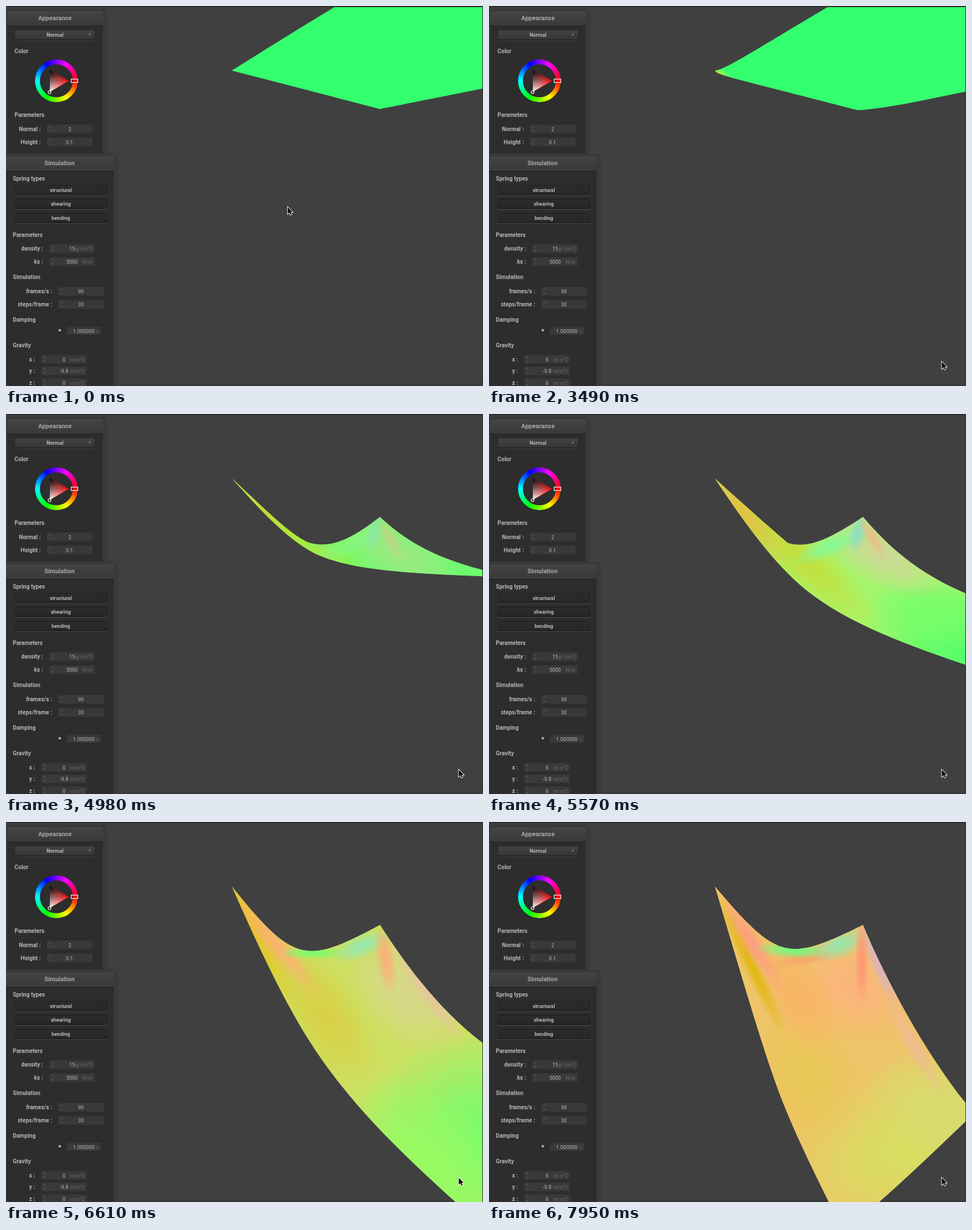
Write an HTML page with a canvas that moves like this. It is 838x668 px and loops after 8 s.

```html
<!DOCTYPE html>
<html>
<head>
<meta charset="utf-8">
<title>Cloth simulation</title>
<style>
html, body { margin: 0; width: 100%; height: 100%; overflow: hidden; background: #404040; }
canvas { display: block; }
</style>
</head>
<body>
<canvas id="stage" width="838" height="668"></canvas>
<script>
const W = 838, H = 668, LOOP = 8000;
const stage = document.getElementById('stage').getContext('2d');
const makeLayer = () => Object.assign(document.createElement('canvas'), { width: W, height: H }).getContext('2d');
const ui = makeLayer(), cloth = makeLayer();

// ---------- control panels ----------
function rect(x, y, w, h, color, radius = 0) {
  ui.fillStyle = color;
  ui.beginPath();
  ui.roundRect(x, y, w, h, radius);
  ui.fill();
}

function text(str, x, y, size = 10, weight = 'bold', color = '#b4b4b4', align = 'left') {
  ui.font = `${weight} ${size}px Roboto, sans-serif`;
  ui.fillStyle = color;
  ui.textAlign = align;
  ui.fillText(str, x, y + size * 0.36);
}

function line(points, color, width = 1) {
  ui.strokeStyle = color;
  ui.lineWidth = width;
  ui.beginPath();
  points.forEach(([x, y]) => ui.lineTo(x, y));
  ui.stroke();
}

function vertical(y0, y1, top, bottom) {
  const g = ui.createLinearGradient(0, y0, 0, y1);
  g.addColorStop(0, top);
  g.addColorStop(1, bottom);
  return g;
}

function panel(x, y, w, h, title) {
  rect(x - 8, y - 6, w + 16, h + 8, '#3a3a3a', 8);
  rect(x, y, w, h, '#2d2d2d', 2);
  rect(x, y, w, 25, vertical(y, y + 25, '#434343', '#393939'), 2);
  line([[x, y + 0.5], [x + w, y + 0.5]], '#4c4c4c');
  line([[x, y + 25.5], [x + w, y + 25.5]], '#1c1c1c');
  text(title, x + w / 2, y + 11, 11, 'bold', '#a6a6a6', 'center');
}

function button(x, y, w, h, label, top, bottom) {
  rect(x - 0.5, y - 0.5, w + 1, h + 2, '#4e4e4e', 2);
  rect(x - 0.5, y - 0.5, w + 1, h + 1, '#1b1b1b', 2);
  rect(x + 0.5, y + 0.5, w - 1, h - 1.5, vertical(y, y + h, top, bottom), 1);
  text(label, x + w / 2, y + h / 2, 9, 'bold', '#b8b8b8', 'center');
}

function field(label, y, x, value, cx, unit = '') {
  text(label, x - 11, y, 10, 'bold', '#b4b4b4', 'right');
  rect(x, y - 7.5, 80, 15, '#393939', 2);
  for (const d of [-1, 1])
    line([[x + 3.5, y + d * 2.5], [x + 5.5, y + d * 4.5], [x + 7.5, y + d * 2.5]], '#727272', 0.8);
  text(value, cx, y + 0.5, 9, 'normal', '#b8b8b8', 'center');
  text(unit, x + 76, y + 0.5, 9, 'normal', '#6c6c6c', 'right');
}

function colorWheel(cx, cy) {
  const ring = ui.createConicGradient(0, cx, cy);
  for (let i = 0; i <= 6; i++) ring.addColorStop(i / 6, `hsl(${i * 60} 100% 50%)`);
  ui.strokeStyle = ring;
  ui.lineWidth = 8.5;
  ui.beginPath();
  ui.arc(cx, cy, 33.2, 0, 7);
  ui.stroke();

  const fade = (x0, y0, x1, y1, from, to) => {
    const g = ui.createLinearGradient(x0, y0, x1, y1);
    g.addColorStop(0, from);
    g.addColorStop(1, to);
    ui.fillStyle = g;
    ui.fill();
  };
  ui.beginPath();
  ui.moveTo(cx + 22, cy);
  ui.lineTo(cx - 11.5, cy + 19.5);
  ui.lineTo(cx - 11.5, cy - 19.5);
  ui.closePath();
  fade(cx + 22, cy, cx - 11.5, cy + 19.5, '#f00', '#fff');
  fade(cx - 11.5, cy - 19.5, cx + 5, cy + 10, '#000', '#0000');

  ui.lineWidth = 1.2;
  ui.strokeStyle = '#fff';
  ui.strokeRect(cx + 26, cy - 3, 11.5, 6);
  ui.beginPath();
  ui.arc(cx - 12, cy + 20, 2.5, 0, 7);
  ui.stroke();
}

function drawUi() {
  rect(0, 0, W, H, '#404040');
  rect(197, 664, W, 4, '#3b3b3b');
  rect(0, 0, W, 1.5, '#232323');
  rect(837, 0, 1, H, '#2c2c2c');

  panel(2, 10, 168, 255, 'Appearance');
  button(15, 42, 142, 18, 'Normal', '#434343', '#353535');
  line([[146, 48], [148, 50], [146, 52]], '#b8b8b8');
  text('Color', 15, 79);
  colorWheel(88.5, 131.5);
  text('Parameters', 15, 191);
  field('Normal :', 216, 72, '2', 112);
  field('Height :', 239, 72, '0.1', 111.5);

  panel(-1, 265, 190, 420, 'Simulation');
  text('Spring types', 12, 303);
  ['structural', 'shearing', 'bending'].forEach((s, i) =>
    button(16, 315 + i * 24.6, 160.5, 17, s, '#2c2c2c', '#262626'));
  text('Parameters', 12, 402);
  field('density :', 426.5, 76, '15', 116, 'g/cm^2');
  field('ks :', 449.5, 76, '5000', 116, 'N/m');
  text('Simulation', 12, 476.5);
  field('frames/s :', 501.5, 92, '90', 131.5);
  field('steps/frame :', 524.5, 92, '30', 131.5);
  text('Damping', 12, 551.5);
  rect(90, 566, 9, 9, '#1c1c1c', 5);
  rect(91, 566.5, 7, 7, '#4a4a4a', 4);
  rect(92.5, 568, 4, 4, '#b0b0b0', 2);
  rect(107, 564, 60, 14, '#393939', 2);
  text('1.000000', 155.5, 571.5, 9, 'normal', '#b8b8b8', 'right');
  text('%', 163, 571.5, 8, 'normal', '#6c6c6c', 'right');
  text('Gravity', 12, 596.5);
  field('x :', 621, 62, '0', 102, 'm/s^2');
  field('y :', 641.5, 62, '-9.8', 102, 'm/s^2');
  field('z :', 662, 62, '0', 102, 'm/s^2');
}

// ---------- cloth ----------
// Each curve starts at PIN and holds two cubic segments per key.
const PIN = [397, 113.5];
const KNOTS = [-1, 0, 6, 14, 21, 30];
const nearEdge = [
  [484, 136, 570, 158, 657, 181, 720, 168, 800, 153, 900, 132],
  [402, 120, 520, 150, 657, 181, 685, 184, 800, 157, 900, 138],
  [500, 222, 560, 250, 657, 181, 690, 200, 760, 228, 900, 232],
  [515, 250, 540, 258, 657, 181, 710, 243, 775, 300, 900, 338],
  [507, 251, 528, 250, 657, 181, 703, 252, 780, 362, 890, 423],
  [509, 246, 526, 245, 657, 181, 700, 285, 775, 422, 852, 512]
];
const freeEdge = [
  [450, 80, 505, 46, 577, 2, 680, -61, 780, -123, 900, -197],
  [412, 114, 470, 76, 595, 2, 700, -60, 800, -120, 900, -179],
  [440, 146, 485, 176, 545, 176, 615, 174, 760, 138, 900, 104],
  [440, 178, 490, 250, 545, 299, 625, 370, 750, 412, 900, 462],
  [432, 193, 480, 300, 530, 380, 610, 508, 720, 606, 850, 722],
  [430, 224, 465, 345, 496, 437, 527, 530, 570, 612, 620, 715]
];
const fold = [
  nearEdge[0],
  [403, 122, 420, 124, 648, 183, 680, 183, 800, 157, 900, 138],
  [455, 170, 503, 226, 555, 230, 590, 226, 720, 226, 900, 231],
  [440, 152, 483, 191, 524, 226, 620, 280, 720, 320, 900, 345],
  [430, 165, 480, 230, 525, 300, 620, 380, 700, 450, 880, 560],
  [430, 180, 480, 260, 540, 330, 620, 400, 700, 480, 780, 560]
];

// Surface tints per key: base, then soft ellipses [x, y, rx, ry, angle, color].
const GREEN = '#34ff6e';
const tints = [
  [GREEN],
  [GREEN, [404, 117, 24, 8, 0.4, '#9cf040']],
  [GREEN,
    [455, 160, 215, 90, 0.5, '#86fa00'], [500, 190, 90, 36, 0.6, '#86fa00'],
    [455, 149, 75, 9, 0.55, '#c4f090'], [552, 231, 36, 8, 0, '#34f58c']],
  ['#a6f66c',
    [860, 420, 210, 120, 0.3, '#4cff68'], [780, 350, 120, 60, 0.3, '#78ff6a'],
    [690, 245, 130, 60, 0.5, '#cfd898'], [545, 250, 190, 50, 0.75, '#c4de3c'],
    [440, 165, 130, 42, 0.9, '#e4c040'], [600, 232, 75, 20, -0.4, '#86f896'],
    [648, 207, 16, 42, 0.25, '#90dcc4'], [674, 217, 14, 48, -0.5, '#e6c088']],
  ['#cde062',
    [850, 560, 240, 200, 0, '#72ff6c'], [740, 600, 190, 120, 0.8, '#98fb62'],
    [700, 300, 130, 80, 0.8, '#d8d88c'], [560, 340, 150, 70, 1, '#d8d044'],
    [430, 180, 170, 34, 1.1, '#e4c41c'], [475, 215, 125, 24, 0.88, '#fcb070'],
    [540, 230, 62, 12, 0, '#78fc70'], [625, 218, 55, 22, -0.4, '#94e8b0'],
    [667, 240, 18, 64, -0.15, '#fcae78'], [740, 300, 120, 18, 0.95, '#e6c69c']],
  ['#eec468',
    [740, 570, 240, 150, -0.4, '#d6e060'], [800, 510, 150, 100, 0.6, '#d8dc70'],
    [560, 450, 130, 90, 1.2, '#e8c854'], [640, 290, 120, 90, 0.5, '#fcb47c'],
    [545, 310, 110, 60, 1, '#f8b464'], [460, 250, 150, 16, 1.13, '#e0b810'],
    [463, 213, 108, 20, 1.02, '#ff9c80'], [555, 240, 70, 13, -0.2, '#f8a468'],
    [535, 225, 70, 15, 0.05, '#6cfc80'], [617, 215, 52, 26, -0.4, '#94e8b0'],
    [683, 245, 16, 95, -0.4, '#d8b4c0'], [655, 245, 13, 80, 0, '#ff9674'],
    [745, 390, 110, 18, 1.05, '#f0bc90']]
];

function segment(knots, s) {
  let i = 0;
  while (i < knots.length - 2 && s >= knots[i + 1]) i++;
  return i;
}

function spline(knots, keys, s) {
  const i = segment(knots, s), span = knots[i + 1] - knots[i], u = (s - knots[i]) / span;
  const last = keys.length - 1;
  return keys[i].map((a, k) => {
    const slope = j => {
      const lo = Math.max(j - 1, 0), hi = Math.min(j + 1, last);
      return (keys[hi][k] - keys[lo][k]) / (knots[hi] - knots[lo]) * span;
    };
    const d = keys[i + 1][k] - a, m0 = slope(i), m1 = slope(i + 1);
    return a + u * (m0 + u * (3 * d - 2 * m0 - m1 + u * (m0 + m1 - 2 * d)));
  });
}

function fillBetween(p, q) {
  const [x, y] = q.slice(10);
  cloth.beginPath();
  cloth.moveTo(...PIN);
  cloth.bezierCurveTo(...p.slice(0, 6));
  cloth.bezierCurveTo(...p.slice(6));
  cloth.quadraticCurveTo(x + 20, y + 3, x, y);
  cloth.bezierCurveTo(q[8], q[9], q[6], q[7], q[4], q[5]);
  cloth.bezierCurveTo(q[2], q[3], q[0], q[1], ...PIN);
  cloth.fill();
}

function paint([base, ...spots], alpha) {
  cloth.globalAlpha = alpha;
  cloth.fillStyle = base;
  cloth.fillRect(0, 0, W, H);
  for (const [x, y, rx, ry, angle, color] of spots) {
    const g = cloth.createRadialGradient(0, 0, 0, 0, 0, 1);
    g.addColorStop(0, color);
    g.addColorStop(0.4, color + 'b8');
    g.addColorStop(1, color + '00');
    cloth.save();
    cloth.translate(x, y);
    cloth.rotate(angle);
    cloth.scale(rx, ry);
    cloth.fillStyle = g;
    cloth.fillRect(-1, -1, 2, 2);
    cloth.restore();
  }
}

function drawCloth(s) {
  const [near, free, mid] = [nearEdge, freeEdge, fold].map(keys => spline(KNOTS, keys, s));
  cloth.clearRect(0, 0, W, H);
  cloth.save();
  cloth.beginPath();
  cloth.rect(0, 2, 837, H);
  cloth.clip();
  cloth.fillStyle = GREEN;
  fillBetween(near, free);
  fillBetween(near, mid);
  fillBetween(mid, free);
  cloth.globalCompositeOperation = 'source-atop';
  const i = segment(KNOTS, s), mix = (s - KNOTS[i]) / (KNOTS[i + 1] - KNOTS[i]);
  paint(tints[i], 1);
  if (mix > 0) paint(tints[i + 1], mix);
  cloth.restore();
}

// ---------- pointer ----------
const pointerPath = [[495, 353.5], [580, 220], [700, 60], [790, 29], [826, 180], [815, 480], [795.5, 625.5]];
const arrow = new Path2D('M0 0V12L2.8 9.5L4.6 13.6L6.6 12.7L4.8 8.8H8.4Z');

function drawPointer([x, y]) {
  stage.save();
  stage.translate(x, y);
  stage.lineWidth = 1.8;
  stage.strokeStyle = '#fff';
  stage.stroke(arrow);
  stage.fillStyle = '#000';
  stage.fill(arrow);
  stage.restore();
}

// ---------- playback ----------
const stepAt = (t, start) => Math.floor((t - start + 5) / 148.5);

function frame() {
  const t = performance.now() % LOOP;
  drawCloth(Math.min(30, Math.max(-1, stepAt(t, 3490))));
  stage.drawImage(ui.canvas, 0, 0);
  stage.drawImage(cloth.canvas, 0, 0);
  drawPointer(pointerPath[Math.min(6, Math.max(0, stepAt(t, 500) + 1))]);
  requestAnimationFrame(frame);
}

drawUi();
frame();
</script>
</body>
</html>
```
